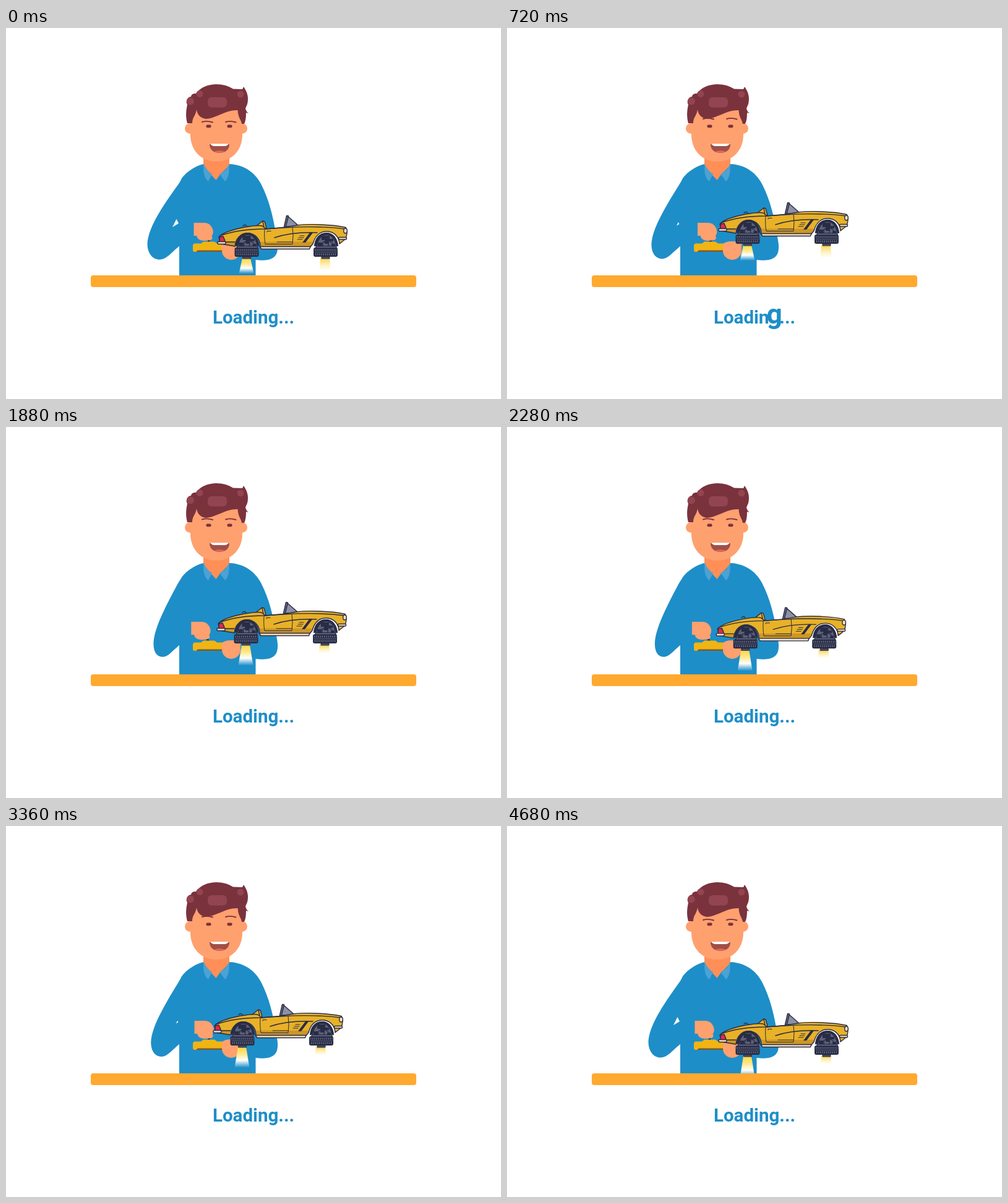
An HTML page for the animation above (4720 ms loop, 800 by 600 pixels).

```html
<!DOCTYPE html>
<html lang="en">
<head>
<meta charset="utf-8">
<title>Loading</title>
<style>
html, body { margin: 0; width: 100%; height: 100%; overflow: hidden; background: #fff; }
svg { position: absolute; left: 0; top: 0; }
#label { position: absolute; left: 0; top: 448px; width: 800px; text-align: center; white-space: nowrap;
  font: 700 29.5px/40px Roboto, sans-serif; color: #1e8ec8; }
#label span { display: inline-block; transform-origin: 50% 30px; }
.skin { fill: #ffa06f; } .neck { fill: #ff8f57; } .hair { fill: #7a323c; } .shine { fill: #924450; }
.shirt { fill: #1e8ec8; } .collar { fill: #4ba2d4; } .dark { fill: #292c45; } .cream { fill: #f3dfc2; }
.ink { stroke: #292c45; stroke-width: 1.4; stroke-linejoin: round; stroke-linecap: round; }
.line { fill: none; }
</style>
</head>
<body>
<svg width="800" height="600" viewBox="0 0 800 600">
  <defs>
    <linearGradient id="glow" x1="0" y1="0" x2="0" y2="1">
      <stop offset="0" stop-color="#fbd543"/><stop offset=".35" stop-color="#ffe88a"/>
      <stop offset=".65" stop-color="#fff"/><stop offset="1" stop-color="#fff" stop-opacity="0"/>
    </linearGradient>
    <linearGradient id="spark" x1="0" y1="0" x2="0" y2="1">
      <stop offset="0" stop-color="#fad03c"/><stop offset="1" stop-color="#fff3c0" stop-opacity=".2"/>
    </linearGradient>
    <linearGradient id="paint" x1="0" y1="0" x2="0" y2="1">
      <stop offset=".76" stop-color="#e8b127"/><stop offset=".78" stop-color="#cd9726"/>
    </linearGradient>
    <g id="wheel">
      <path fill="#5d6279" d="M-19 1C-18-14-9-21 1-21S19-13 20 1Z"/>
      <path class="dark" d="M-19 1C-18-14-9-21 1-21S19-13 20 1L16 0C14-11 9-17 1-17S-12-10-14 0ZM-7-16H6V-11H12V-7H5V-3H-2V-9H-7ZM-13-5H-6V1H-13ZM9-3H15V1H9Z"/>
      <path class="ink line" stroke="#8d91a5" d="M-5 2V-5L3-9L11-4M4-9V2"/>
      <rect x="-16" y="1" width="33" height="4" rx="1" fill="#777c92" class="ink"/>
      <rect class="dark" x="-20" y="3" width="39" height="15" rx="3"/>
      <path class="line" stroke="#73788e" stroke-width="3" stroke-dasharray="1.2 2" d="M-18 7H18M-17 14H18"/>
      <path class="line" stroke="#555b73" stroke-width="1" d="M-18 10.5H18"/>
      <path fill="#4b5067" stroke="#292c45" d="M-7 18H6V21H-7Z"/>
    </g>
  </defs>

  <path id="arm" class="shirt"/>
  <path class="shirt" d="M319 220C303 224 291 234 284 243L275 262L280 300V401H403.500V375C421 377 434 375 438 363C440 355 439 348 437 338C432 305 425 277 412 252C402 233 384 221 361 220Z"/>
  <path id="gap" fill="#fff" d="M275.500 309L279 316L269 322Z"/>

  <path class="neck" d="M319 205H361V222L346 237L339.500 246L332 238L319 222Z"/>
  <path class="collar" d="M320 219C317.500 233 321 244 327 248L333 236C326 232 321 226 320 219ZM360 219C362 233 359 244 354 248L345 236C354 232 359 226 360 219Z"/>
  <g class="skin">
    <circle cx="297.500" cy="162.500" r="8.500"/><circle cx="381.500" cy="162.500" r="8.500"/>
    <path d="M298 130V172C298 199 316 216 340 216S382 199 382 172V130Z"/>
  </g>
  <path id="brows" class="line" stroke="#7a323c" stroke-width="1.900" stroke-linecap="round" d="M317 152Q325 149.500 334 152.500M355 152Q363 149.500 371.500 152.500"/>
  <g id="eyes" class="hair"><rect x="323.500" y="156.500" width="8" height="4.700" rx="2"/><rect x="357.500" y="156.500" width="8" height="4.700" rx="2"/></g>
  <path fill="#a04f47" d="M329 188Q345 190 361 188C361 197 354 202 345 202S329 197 329 188Z"/>
  <path fill="#e2695b" d="M336 200Q345 196.500 354 200Q345 203.500 336 200Z"/>
  <path fill="#fff" d="M330.500 187.300H359.500Q358 191 353 191H337Q332 191 330.500 187.300Z"/>
  <path class="hair" d="M293 154C290 143 291 133 293 124C289 117 295 111 299 111C300 106 304 106 307 106C314 96 327 91 340 91C351 91 360 94 367 98.500L382 99L384 95C389 102 393 111 390 123L387 130Q388 135 392 138L388 137Q388 149 385 155H381C380 148 375 145 374.500 133C355 132 340 146 323 147Q310 145 308 132C306 143 301 144 301 154Z"/>
  <g class="shine">
    <circle cx="298" cy="118.500" r="6"/><circle cx="313" cy="106.500" r="5.500"/>
    <circle cx="379" cy="107" r="5.500"/><rect x="326" y="112" width="31" height="16.500" rx="6"/>
  </g>

  <path id="stick" stroke="#292c45" stroke-width="3"/>
  <path fill="#f0b414" d="M304 348.500H315L319 345.500H337L341 348.500H354V362H305Q302 362 302 359V351Z"/>
  <path fill="#7d5a28" d="M307 362L310 359.500H352V362Z"/>
  <path class="skin" d="M349 357V350Q352 345 364 345H379V360A15 15 0 0 1 349 360Z"/>
  <path id="hand" class="skin" d="M303.500 315H320A14.500 14.500 0 0 1 332.500 337A3.500 3.500 0 0 1 330 343Q325 344 320 344Q310 344 308 336H303.500Z"/>

  <g id="car">
    <path id="rear" fill="url(#glow)"/>
    <path id="front" fill="url(#spark)"/>
    <path class="ink" fill="#e8b127" d="M406 319L415 312L418 313L421 324H410Z"/>
    <path class="ink line" d="M415 313L417 322M383 320Q386 317 389 320"/>
    <path class="ink" fill="#8d91a5" d="M451 321L456 305L472 319L468 322Z"/>
    <path class="ink" fill="#666b82" d="M449 323L453.500 303.500L456.500 304L452 322Z"/>
    <path class="ink" fill="url(#paint)" d="M344 338C350 331 366 326 386 322C398 320 410 319 414 320L420 325L449 322.500L470 319C490 316.500 528 317.500 549 322.500C552 327 551 335 549 341L539 349C538 336 529 329 518 329C506 329 499 338 496 349L492 354H411C411 340 402 332 390 332C379 332 371 341 370 353L347 349Z"/>
    <path class="cream ink" d="M410 353.500H492L490.500 357.500H413Z"/>
    <g class="ink line">
      <path d="M346 336C368 328 392 325 419 325L448 323C482 321 518 321 548 325"/>
      <path stroke-width="1" d="M418 325Q417 340 419 349.500H463Q465 335 463 322.500M422 330V328.500H428M438 346H463M475 336H482M473 339H481M471 342H479"/>
      <path d="M434 339C455 332 475 330 503 331M355 346H370"/>
    </g>
    <path class="dark" d="M479 347L491 331H496L484 347Z"/>
    <path class="ink" fill="#e5274c" d="M345 338L351 337L354 344L353 346H345Z"/>
    <rect class="cream ink" x="342" y="345.500" width="13" height="4" rx="1.500"/>
    <rect class="cream ink" x="537.500" y="338.500" width="13" height="3.500" rx="1.500"/>
    <ellipse class="cream ink" cx="548.500" cy="328" rx="2.800" ry="4"/>
    <use href="#wheel" x="389.500" y="352"/><use href="#wheel" x="517" y="352"/>
  </g>
  <rect x="137" y="400" width="526" height="19" rx="4" fill="#ffa930"/>
</svg>
<div id="label"></div>
<script>
const LOOP = 4720, WAVE = LOOP / 2, STEP = 30;
const $ = id => document.getElementById(id);
const mix = (a, b, k) => a + (b - a) * k;
const set = (id, name, value) => $(id).setAttribute(name, value);

// Eased value between [time, value] keys
function at(keys, t) {
  const i = keys.findIndex(k => k[0] > t), [t0, a] = keys[i - 1], [t1, b] = keys[i];
  return mix(a, b, (1 - Math.cos(Math.PI * (t - t0) / (t1 - t0))) / 2);
}

const carX = [[0, 0], [720, 0], [1400, 1], [1880, -1], [2720, -7], [3360, -7], [3920, 1], [LOOP, 0]];
const carY = [[0, 0], [720, -21], [1880, -20], [2720, -2], [3360, -15], [3960, -8], [4640, 0], [LOOP, 0]];
const elbow = [[0, 0], [600, .45], [1120, .43], [1300, .36], [1880, .9], [2720, 1], [3360, .52], [3960, .22], [4480, 0], [LOOP, 0]];
const handX = [[0, 0], [720, 4.5], [1200, 4.5], [1880, -4.2], [2720, -5], [3360, 1], [3960, 1], [4480, 0], [LOOP, 0]];
const browY = [[0, 0], [720, -5], [1160, -5], [1880, -2.5], [2840, -2.5], [3320, -5], [3960, -5], [4640, 0], [LOOP, 0]];
const lids = [[0, 1], [3560, 1], [3660, .1], [3760, 1], [LOOP, 1]];

const letters = [..."Loading..."].map(c => {
  const span = document.createElement("span");
  span.textContent = c;
  return $("label").appendChild(span);
});

function armPath(u) {
  const p = (x0, y0, x1, y1) => mix(x0, x1, u) + " " + mix(y0, y1, u) + " ";
  return "M292 234Q" + p(286, 241, 281, 246) + p(282, 248, 275, 258) +
    "C" + p(256, 284, 252, 302) + p(229, 322, 239, 332) + p(228.5, 350, 239.5, 352) +
    "C" + p(229, 366, 240, 365) + p(238, 374.5, 245, 371.5) + p(248, 374.5, 254, 371.5) +
    "C" + p(260, 374.5, 262, 371.5) + p(268, 362, 268, 363) + "281 352L290 250Z";
}

const flame = (x, y, half, length, flare) =>
  `M${x - half} ${y}H${x + half}L${x + half + flare} ${y + length}H${x - half - flare}Z`;

function draw(t) {
  const u = at(elbow, t), hx = at(handX, t);
  set("arm", "d", armPath(u));
  set("gap", "transform", `translate(278 318) scale(${Math.max(0, 1 - u / .8)}) translate(-278 -318)`);
  set("hand", "transform", `translate(${hx} 0)`);
  set("stick", "d", `M327 347L${329 + hx * 1.2} 338`);
  set("brows", "transform", `translate(0 ${at(browY, t)})`);
  set("eyes", "transform", `translate(0 159) scale(1 ${at(lids, t)}) translate(0 -159)`);
  set("car", "transform", `translate(${at(carX, t)} ${at(carY, t)})`);

  const flicker = Math.cos(2 * Math.PI * (47 * t / LOOP - .1));
  set("rear", "d", flame(388.5, 372, 6.5, 30 - 5.5 * flicker, 5.5));
  set("front", "d", flame(515.5, 372, 7.5, 16 + 4 * flicker, 1.5));

  // The pulse runs through the letters and back again
  const last = letters.length - 1;
  const pos = last - Math.abs((t % WAVE - 360) / STEP - last);
  letters.forEach((span, i) => {
    const size = 1 + .5 * Math.min(1, Math.max(0, 1.3 - 1.3 * Math.abs(pos - i)));
    span.style.transform = `scale(${size})`;
  });
}

function tick() {
  draw(performance.now() % LOOP);
  requestAnimationFrame(tick);
}
tick();
</script>
</body>
</html>
```
